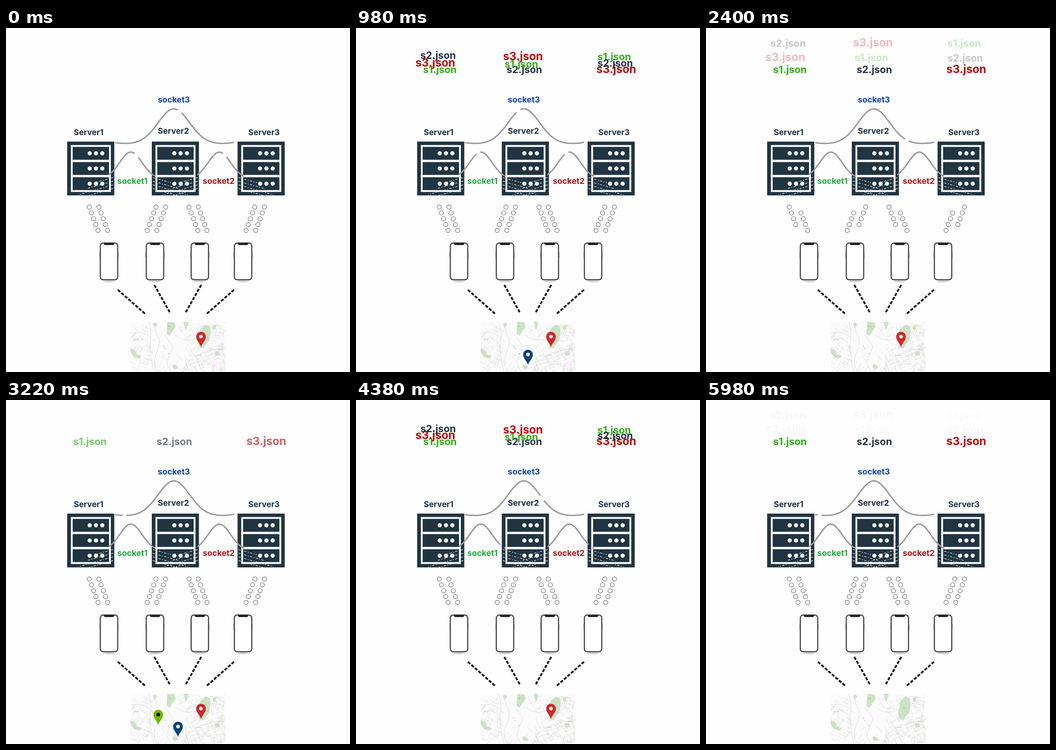
Animation, 748 px wide and 748 px high, one loop 6000 ms. Source, as an HTML page:

```html
<!DOCTYPE html>
<html lang="en">
<head>
<meta charset="utf-8">
<title>Servers, sockets and phones</title>
<style>
  html, body { margin: 0; width: 100%; height: 100%; overflow: hidden; background: #fefefe; }
  svg { display: block; width: 100vw; height: 100vh; }
  text { font-family: Poppins, Inter, "Open Sans", sans-serif; font-weight: 700; text-anchor: middle; }
  .tiny { font-weight: 400; }
  .wire { fill: none; stroke: #989898; stroke-width: 3; }
  .ring { fill: none; stroke: #7c7c7c; stroke-width: 1.4; }
  .link { stroke: #161616; stroke-width: 4; stroke-dasharray: 7 3.2; }
  .streak { fill: none; stroke: #fff; stroke-opacity: 0.85; stroke-width: 1.3; stroke-dasharray: 5 3 2 3; }
</style>
</head>
<body>
<svg id="stage" viewBox="0 0 748 748">
  <defs>
    <clipPath id="mapArea"><rect x="271" y="639" width="206" height="109"/></clipPath>
    <g id="server" fill="none" stroke="#fff">
      <rect width="102.500" height="117" fill="#203442" stroke="none"/>
      <path d="M10 9.500h83v98h-83z" stroke-width="4"/>
      <path d="M10 42h83M10 75h83" stroke-width="5"/>
    </g>
    <g id="phone">
      <ellipse cy="551" rx="13" ry="1.800" fill="#ccc"/>
      <path d="M-20.500 486v14M20.500 488v12" stroke="#aaa" stroke-width="1.500"/>
      <rect x="-19.500" y="467" width="39" height="81" rx="7" fill="#fff" stroke="#a8a8a8" stroke-width="2"/>
      <rect x="-18.700" y="467.800" width="37.400" height="79.400" rx="6" fill="#fff" stroke="#383838" stroke-width="2"/>
      <path d="M-12 467h24q-1 5-4 5h-16q-3 0-4-5z" fill="#222"/>
    </g>
    <path id="drop" d="M0 0C-2-9-10.500-14-10.500-23A10.500 10.500 0 0 1 10.500-23C10.500-14 2-9 0 0Z"/>
  </defs>
</svg>
<script>
const stage = document.getElementById('stage');
const LOOP = 6000, CYCLE = 3450;
const NAVY = '#203040', RED = '#c00808', GREEN = '#2eb010';

function add(tag, attrs, parent = stage) {
  const el = document.createElementNS('http://www.w3.org/2000/svg', tag);
  for (const k in attrs) el.setAttribute(k, attrs[k]);
  return parent.appendChild(el);
}
function label(str, x, y, size, fill, cls = '') {
  const el = add('text', { x, y, 'font-size': size, fill, class: cls });
  el.textContent = str;
  return el;
}
const clamp = v => Math.max(0, Math.min(1, v));
const ramp = (t, a, b) => clamp((t - a) / (b - a));
const ease = p => (1 - Math.cos(Math.PI * p)) / 2;

let seed = 11;
const rand = () => (seed = seed * 16807 % 2147483647) / 2147483647;

function drawMap() {
  const map = add('g', { 'clip-path': 'url(#mapArea)' });
  add('rect', { x: 271, y: 639, width: 206, height: 109, fill: '#fbfbfb' }, map);
  const parks = [
    'M319 643l7-2 3 4-6 7z', 'M351 639l15 1 3 10-7 9-6 10-7-4 1-13z',
    'M386 639h11l-3 12-3 7z', 'M422 655l12-10 9 3 2 12-3 20-8 8-4 9-10-3-2-13z',
    'M450 647h7l-1 9h-6z', 'M454 704l9-2 3 9-11 2z',
    'M271 696l9 4 4 9 11 4-5 6-11-3-8-11z', 'M363 731l8 2 4 7-8 2-5-4z'
  ];
  for (const d of parks) add('path', { d, fill: '#cce2c4' }, map);

  // Street grids: x, y, width, height, angle, count
  const blocks = [
    [271, 645, 42, 95, 0.5, 60], [385, 690, 92, 58, -0.35, 120],
    [440, 640, 37, 60, 0.25, 45], [368, 640, 52, 50, -0.6, 22], [325, 700, 60, 48, 0.8, 20]
  ];
  let roads = '';
  for (const [x, y, w, h, angle, n] of blocks) {
    for (let i = 0; i < n; i++) {
      const a = angle + (rand() < 0.5 ? 0 : Math.PI / 2) + (rand() - 0.5) * 0.3;
      const len = 5 + rand() * 14;
      roads += `M${x + rand() * w} ${y + rand() * h}l${Math.cos(a) * len} ${Math.sin(a) * len}`;
    }
  }
  add('path', { d: roads, fill: 'none', stroke: '#dcdcdc', 'stroke-width': 0.8 }, map);
  const main = 'M310 639q8 22 4 42t8 67M324 639q-2 18 6 30t-3 38 5 41'
    + 'M271 664q24-8 42 8M345 668l18 24-14 36 10 20M368 668q24 18 50 6M385 748q10-44 92-52';
  add('path', { d: main, fill: 'none', stroke: '#dadada' }, map);
  for (const [x, y] of [[343, 692], [346, 697], [354, 708]])
    add('circle', { cx: x, cy: y, r: 1.1, fill: '#7db9b9' }, map);
  [['Old Mill', 283, 679], ['Park', 355, 650], ['Green', 432, 671], ['Hilltop', 420, 713], ['East End', 468, 701]]
    .forEach(([s, x, y]) => label(s, x, y, 3, '#999', 'tiny'));
}

function drawServers() {
  [133, 317, 503.5].forEach((x, i) => {
    add('use', { href: '#server', x, y: 247 });
    for (let k = 0; k < 9; k++)
      add('circle', { cx: x + 49 + k % 3 * 13.7, cy: 272.5 + Math.floor(k / 3) * 33, r: 4.5, fill: '#fff' });
    // Broken light streaks on the lowest bay
    let d = '';
    for (let k = 0; k < 4; k++) {
      const y = 325 + k * 8, len = 40 + k * 18;
      if (i !== 0) d += `M${x + 2} ${y}l${len} ${len / 3.5}`;
      if (i !== 2) d += `M${x + 100} ${y}l${-len} ${len / 3.5}`;
    }
    add('path', { d, class: 'streak', 'clip-path': 'inset(0 0 0 0)' });
  });
  add('rect', { x: 130, y: 364, width: 480, height: 12, fill: '#fefefe' });
}

drawMap();
drawServers();
for (const x of [224, 324, 421.5, 515.5]) add('use', { href: '#phone', x });
label('Server1', 179.5, 232.5, 17.5, NAVY);
label('Server2', 364, 230, 17.5, NAVY);
label('Server3', 561, 232.5, 17.5, NAVY);
label('socket1', 275, 338.5, 17.8, '#1faa3c');
label('socket2', 462.5, 338.5, 17.8, '#ae1418');
label('socket3', 365, 162, 17.8, '#1040b0');

// Rings: top x of the left and right columns, slant per row
const rings = [];
[[181, 202, 4.75], [326, 347, -4.75], [398, 418, 4.75], [541, 562, -4.75]].forEach(([left, right, dx]) => {
  [left, right].forEach((x, col) => {
    const down = (col === 0) === (dx > 0);
    for (let i = 0; i < 5; i++) {
      const el = add('circle', { cx: x + dx * i, cy: 389.3 + 12.7 * i, r: 4.6, class: 'ring' });
      rings.push({ el, order: down ? i : 4 - i });
    }
  });
});

// Links grow from the map up to the phones
const links = [[302, 621, 243, 569], [356, 618, 321, 556], [391, 618, 426, 556], [437, 621, 496, 569]]
  .map(([x1, y1, x2, y2]) => ({ el: add('line', { x1, y1, x2, y2, class: 'link' }), x1, y1, x2, y2 }));

const pins = [[424, 694, '#d02626', '#f4f4ea', 0], [374, 733, '#06417f', '#fff', 510], [331, 707, '#72b800', '#000', 1010]]
  .map(([x, y, fill, hole, on]) => {
    const el = add('g', { transform: `translate(${x} ${y})` });
    add('use', { href: '#drop', fill }, el);
    add('circle', { cy: -23, r: 4, fill: hole }, el);
    return { el, on };
  });

// Files: text, x, size, colour, rise in px, rise duration (0 stays put)
const REST = 97.5;
const files = [
  ['s1.json', 182.5, 21.5, GREEN, 0, 0],
  ['s3.json', 172.5, 24.2, RED, 26, 1520],
  ['s2.json', 178.5, 21.5, NAVY, 57, 1520],
  ['s2.json', 366, 21.5, NAVY, 0, 0],
  ['s1.json', 359.5, 21.5, GREEN, 26, 1740],
  ['s3.json', 363, 24.2, RED, 57.5, 1610],
  ['s3.json', 566, 24.2, RED, 0, 0],
  ['s1.json', 561.5, 21.5, GREEN, 57, 1610],
  ['s2.json', 563.5, 21.5, NAVY, 25, 1500]
].map(([s, x, size, fill, rise, dur]) => ({ el: label(s, x, REST, size, fill), rise, dur }));

// Wires are bell curves with a travelling gap
const bell = (mid, base, height, spread) => x => base - height * Math.exp(-(((x - mid) / spread) ** 2));
const wide = bell(365, 252.3, 76.5, 48.5);
const wires = [
  { y: bell(271.5, 327.5, 57.7, 34.5), from: 224, to: 325, gap: u => 284 - (u - 330) * 0.235 },
  { y: bell(464, 327.5, 57.7, 34.5), from: 416, to: 518, gap: u => 476 - (u - 330) * 0.235 },
  { y: x => wide(x) - 3.5 * ((x - 365) / 129) ** 8, from: 237, to: 496, gap: longGap }
].map(w => ({ ...w, el: add('path', { class: 'wire' }) }));

function longGap(u) {
  const keys = [[0, 478], [15, 437], [330, 378], [405, 353.5], [585, 308], [650, 300.5], [880, 247.5], [905, 237]];
  const i = keys.findIndex(k => k[0] > u);
  const [a, xa] = keys[i - 1], [b, xb] = keys[i];
  return xa + (xb - xa) * (u - a) / (b - a);
}
function curve(y, from, to) {
  if (to - from < 0.5) return '';
  const n = Math.ceil((to - from) / 3);
  let d = '';
  for (let i = 0; i <= n; i++) {
    const x = from + (to - from) * i / n;
    d += (i ? 'L' : 'M') + x.toFixed(2) + ' ' + y(x).toFixed(2);
  }
  return d;
}

function render(t) {
  const u = t % CYCLE;

  for (const { el, rise, dur } of files) {
    const shown = dur
      ? ramp(u, 280, 440) * (1 - ramp(u, 2000, 2545))
      : ramp(u, 40, 240) * (1 - ramp(u, 3150, 3350));
    el.setAttribute('opacity', shown);
    if (dur) el.setAttribute('y', REST - rise * ease(ramp(u, 195, 195 + dur)));
  }

  const filling = u > 1950 && u < 2450;
  for (const { el, order } of rings)
    el.setAttribute('opacity', filling && u < 2050 + order * 100 ? 0 : 1);

  const grow = u < 2150 ? 1 : ramp(u, 2150, 2380);
  for (const { el, x1, y1, x2, y2 } of links) {
    el.setAttribute('x2', x1 + (x2 - x1) * grow);
    el.setAttribute('y2', y1 + (y2 - y1) * grow);
  }

  const p = t % 2000;
  for (const { el, on } of pins) el.setAttribute('opacity', p >= on && p < 1510 ? 1 : 0);

  const flow = (t - 1480 + 1810) % 905;
  for (const { el, y, from, to, gap } of wires) {
    const c = gap(flow);
    el.setAttribute('d', curve(y, from, Math.min(to, c - 4)) + curve(y, Math.max(from, c + 4), to));
  }
}

function tick() {
  render(performance.now() % LOOP);
  requestAnimationFrame(tick);
}
tick();
</script>
</body>
</html>
```
